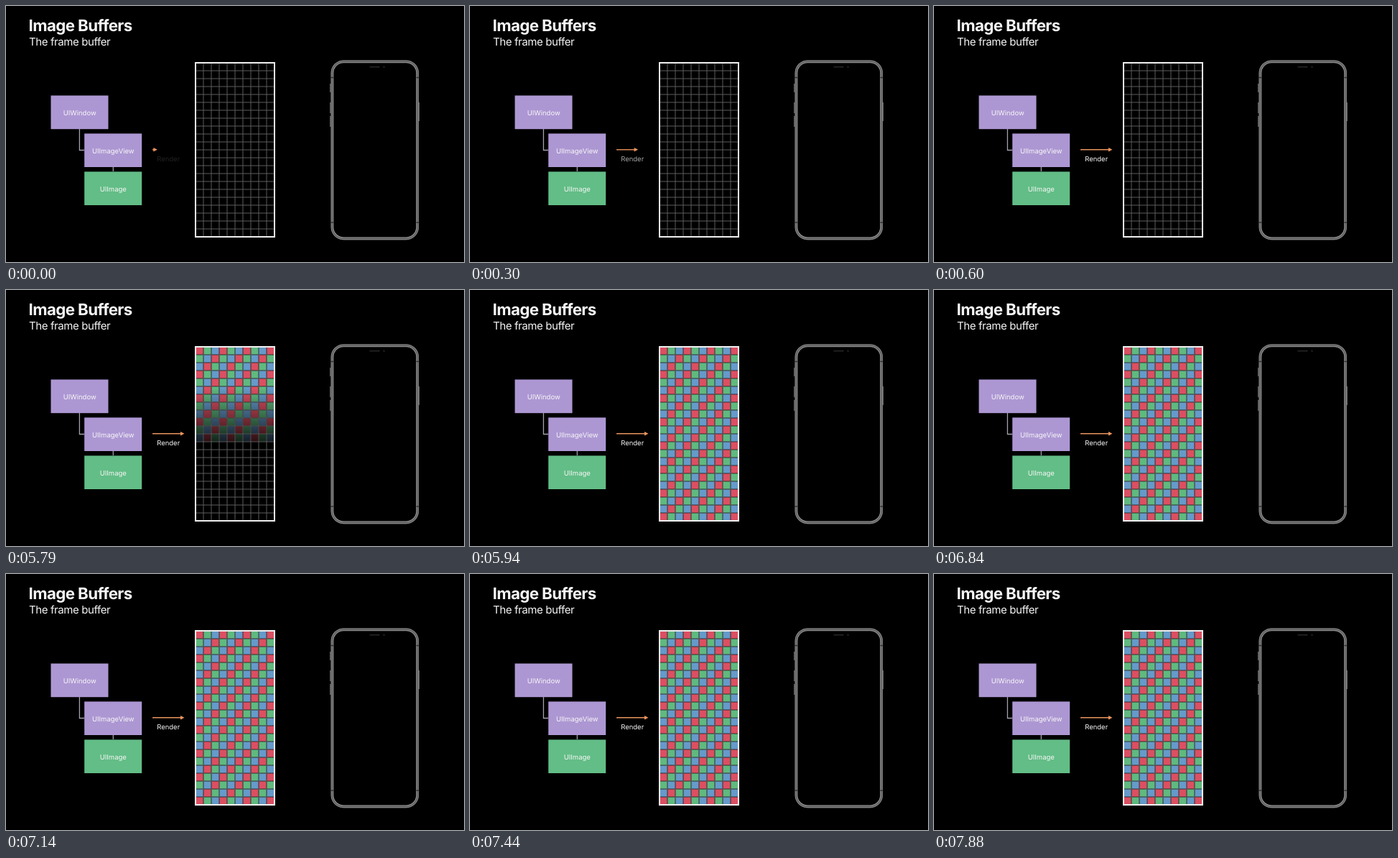
Recreate the animation shown at these times as an HTML page. Size 638 by 356 pixels, loop 8000 ms.

```html
<!DOCTYPE html>
<html lang="en">
<head>
<meta charset="utf-8">
<style>
  html, body { margin: 0; width: 100%; height: 100%; overflow: hidden; background: #000; }
  svg { display: block; }
  text { font: 9.5px Inter, sans-serif; fill: #f6f6f6; text-anchor: middle; text-rendering: geometricPrecision; }
  .title { font-size: 22.3px; font-weight: 700; letter-spacing: -.6px; text-anchor: start; }
  .subtitle { font-size: 15px; letter-spacing: -.4px; text-anchor: start; }
  .line { fill: none; stroke: #a39fae; stroke-width: 1.3; }
</style>
</head>
<body>
<svg width="638" height="356" viewBox="0 0 638 356">
  <defs>
    <linearGradient id="fade" gradientUnits="userSpaceOnUse" x1="0" x2="0">
      <stop offset="0" stop-color="#fff"/>
      <stop offset="1" stop-color="#fff" stop-opacity=".2"/>
      <stop offset="1" stop-color="#fff" stop-opacity="0"/>
    </linearGradient>
    <mask id="reveal" maskUnits="userSpaceOnUse" x="264" y="79" width="110" height="242">
      <rect x="264" y="79" width="110" height="242" fill="url(#fade)"/>
    </mask>
  </defs>

  <rect width="638" height="356"/>
  <text class="title" x="31.5" y="35">Image Buffers</text>
  <text class="subtitle" x="32" y="55.2">The frame buffer</text>

  <path class="line" d="M102.4 171V200.5H109M149.3 224V230"/>
  <rect x="62.5" y="124.5" width="80" height="46.7" fill="#ad97d3"/>
  <rect x="109.2" y="177.4" width="80" height="46.6" fill="#ad97d3"/>
  <rect x="109.2" y="230.4" width="80" height="46.6" fill="#62bd86"/>
  <text x="102.7" y="151.7">UIWindow</text>
  <text x="149.3" y="204.7">UIImageView</text>
  <text x="149.3" y="257.7">UIImage</text>

  <path id="shaft" stroke="#ea945c" stroke-width="1.4"/>
  <path id="head" d="M0 0L-5.5 -2.8V2.8Z" fill="#ea945c"/>
  <text id="render" x="226.2" y="215.7">Render</text>

  <path id="grid" stroke="#5c5c5c"/>
  <g id="pixels" mask="url(#reveal)"></g>
  <rect x="264" y="79" width="110" height="242" fill="none" stroke="#f0f0f0" stroke-width="2"/>

  <g fill="none">
    <path d="M451.9 108V120M451.9 134V149M451.9 153V168M575.2 134V160" stroke="#777" stroke-width="1.4"/>
    <rect x="454.4" y="77.2" width="118.8" height="246.2" rx="16" stroke="#5c5c5c" stroke-width="3.6"/>
    <rect x="453.2" y="76" width="121.2" height="248.6" rx="17" stroke="#858585" stroke-width="1.1"/>
    <rect x="455.7" y="78.6" width="116.2" height="243.4" rx="14.5" stroke="#8c8c8c" stroke-width="1.2"/>
    <path d="M452 99.5H456M571.5 99.5H575.5M452 301H456M571.5 301H575.5" stroke="#333" stroke-width="1.5"/>
    <path d="M507 84.7H520" stroke="#262626" stroke-width="1.5" stroke-linecap="round"/>
    <circle cx="526.5" cy="84.7" r="1.2" fill="#222230"/>
  </g>
</svg>
<script>
const LOOP = 8000, STEP = 150, RENDER_START = 5790;
const LEFT = 264, TOP = 79, CELL = 11, COLS = 10, ROWS = 22;
const COLORS = ['#dc4f62', '#60b97f', '#659aca'];
const byId = id => document.getElementById(id);
const set = (id, attrs) => {
  for (const key in attrs) byId(id).setAttribute(key, attrs[key]);
};

function buildBuffer() {
  let lines = '', cells = '';
  for (let col = 1; col < COLS; col++) lines += `M${LEFT + col * CELL} ${TOP}v${ROWS * CELL}`;
  for (let row = 1; row < ROWS; row++) lines += `M${LEFT} ${TOP + row * CELL}h${COLS * CELL}`;
  for (let row = 0; row < ROWS; row++)
    for (let col = 0; col < COLS; col++)
      cells += `<rect x="${LEFT + col * CELL + .5}" y="${TOP + row * CELL + .5}"
        width="${CELL - 1}" height="${CELL - 1}" fill="${COLORS[(row + col) % 3]}"/>`;
  set('grid', { d: lines });
  byId('pixels').innerHTML = cells;
}

function draw(time) {
  // The arrow grows with an eased motion, sampled in steps.
  const u = Math.min(1, (Math.floor(time / STEP) + 1.2) / 5.2);
  const grow = u * u * (3 - 2 * u);
  const tip = 205 + 43.5 * grow;
  set('shaft', { d: `M204 199.8H${tip - 4}` });
  set('head', { transform: `translate(${tip} 199.8)` });
  set('render', { opacity: grow });

  // The colour sweep runs down the buffer with a soft lower edge.
  const sweep = Math.floor((time - RENDER_START) / STEP);
  const edge = sweep < 0 ? 0 : 211 + 200 * sweep;
  set('fade', { y1: edge - 75, y2: edge });
}

function tick() {
  draw(performance.now() % LOOP);
  requestAnimationFrame(tick);
}
buildBuffer();
tick();
</script>
</body>
</html>
```
